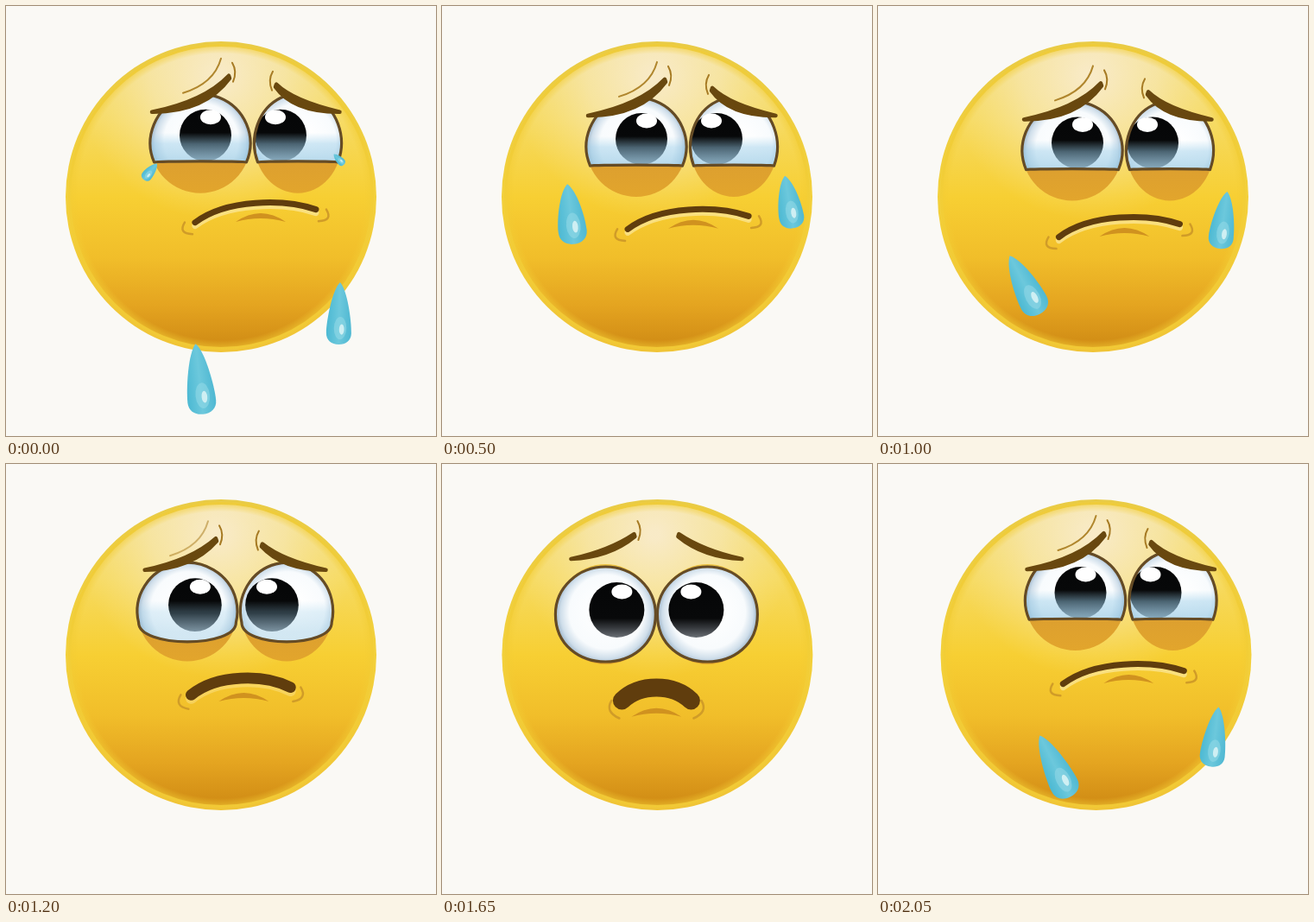
An HTML page with a canvas that plays this animation: 498x498 px, repeating every 2.1 s.

```html
<!DOCTYPE html>
<html lang="en">
<head>
<meta charset="utf-8">
<title>Crying face</title>
<style>
html, body { margin: 0; width: 100%; height: 100%; overflow: hidden; background: #faf9f5; }
canvas { display: block; width: 498px; height: 498px; }
</style>
</head>
<body>
<canvas id="stage" width="498" height="498"></canvas>
<script>
const ctx = document.getElementById('stage').getContext('2d');
const LOOP = 2100, STEP = 50;
const SOB = 375, FIRST_SOB = 1695, SOBS = 4;
const INK = '#69480f';

// lengths are in pixels; brow heights are measured from the eye centre
const sad = {
  x: 284, y: 164, turn: 1, wet: 1, look: -9,
  up: 57, corner: .4, low: -1,
  browIn: -77, browOut: -36, browReach: 58,
  mouthY: 256, mouthReach: 70, lips: 7
};
const wide = {
  x: 248, y: 174, turn: 0, wet: 0, look: -5,
  up: 55, corner: 0, low: 55,
  browIn: -92, browOut: -64, browReach: 42,
  mouthY: 274, mouthReach: 40, lips: 21
};
const tired = {
  x: 261, y: 191, turn: .3, wet: 1, look: -3,
  up: 19, corner: 0, low: 18,
  browIn: -88, browOut: -55, browReach: 49,
  mouthY: 282, mouthReach: 39, lips: 21
};
const poses = [[0, sad], [1120, sad], [1300, wide], [1650, wide], [1850, tired], [2000, sad], [LOOP, sad]];

// key points of a falling tear and the ages at which it meets them
const tearAges = [0, 80, 155, 280, 355, 405, 455];
const tearPaths = [
  { side: -1, width: 33, swell: 80, follow: 1.1,
    points: [[172, 186], [157, 207], [149, 241], [170, 323], [205, 350], [224, 432], [226, 545]] },
  { side: 1, width: 29, swell: 100, follow: .3,
    points: [[384, 176], [390, 186], [402, 227], [400, 248], [390, 316], [386, 356], [384, 545]] }
];

const clamp = k => Math.min(1, Math.max(0, k));
const smooth = k => k * k * (3 - 2 * k);
const mix = (a, b, k) => a + (b - a) * k;
const wave = (t, period, peak) => Math.cos((t - peak) / period * 2 * Math.PI);

function poseAt(t) {
  const i = poses.findLastIndex(([start]) => start <= t);
  const [t0, a] = poses[i], [t1, b] = poses[i + 1];
  const k = smooth((t - t0) / (t1 - t0));
  return Object.fromEntries(Object.keys(a).map(key => [key, mix(a[key], b[key], k)]));
}

function gradient(g, ...stops) {
  stops.forEach(([p, c]) => g.addColorStop(p, c));
  return g;
}

function oval(x, y, rx, ry, fill) {
  ctx.beginPath();
  ctx.ellipse(x, y, rx, ry, 0, 0, Math.PI * 2);
  ctx.fillStyle = fill;
  ctx.fill();
}

function curve(x, y, [cx, cy, ex, ey], color, width) {
  ctx.beginPath();
  ctx.moveTo(x, y);
  ctx.quadraticCurveTo(x + cx, y + cy, x + ex, y + ey);
  ctx.strokeStyle = color;
  ctx.lineWidth = width;
  ctx.stroke();
}

function head() {
  oval(249, 221, 180, 180, gradient(ctx.createLinearGradient(0, 41, 0, 401),
    [0, '#e9cb45'], [.5, '#f3d03a'], [1, '#f0c436']));
  oval(249, 221, 174, 174, gradient(ctx.createLinearGradient(0, 46, 0, 396),
    [0, '#f2dc80'], [.25, '#f6da60'], [.5, '#f7cf33'], [.7, '#f1be2a'], [.86, '#e4a420'], [1, '#cf8a14']));
  oval(249, 221, 174, 174, gradient(ctx.createRadialGradient(246, 82, 5, 246, 82, 165),
    [0, 'rgba(249,236,208,.9)'], [.45, 'rgba(248,234,190,.62)'], [1, 'rgba(249,230,150,0)']));
  oval(249, 221, 177, 177, gradient(ctx.createRadialGradient(249, 221, 166, 249, 221, 177),
    [0, 'rgba(242,204,52,0)'], [1, 'rgba(242,204,52,.7)']));
}

// the outline runs over the top, then back along the lower lid
function eyeShape(p, cx, cy, rx) {
  const dx = rx * Math.cos(p.corner), y = cy + p.up * Math.sin(p.corner), low = y + p.low * 4 / 3;
  ctx.beginPath();
  ctx.ellipse(cx, cy, rx, p.up, 0, Math.PI - p.corner, p.corner);
  ctx.bezierCurveTo(cx + dx, low, cx - dx, low, cx - dx, y);
  ctx.closePath();
}

function eyeball(p, side, cx, cy, rx) {
  oval(cx, cy, 62, 62, gradient(ctx.createRadialGradient(cx + 3, cy - 8, 10, cx, cy, 60),
    [0, '#ffffff'], [.66, '#f8fbfd'], [.85, '#cfdeea'], [1, '#8ea9c1']));
  const px = cx - side * 13 - p.turn * 7, py = cy + p.look, r = 32 - p.turn * 2;
  oval(px, py, r, r, gradient(ctx.createLinearGradient(0, py - r, 0, py + r),
    [0, '#050607'], [.65, '#08090a'], [.82, '#35383c'], [1, '#6a6f75']));
  ctx.globalAlpha = p.wet;
  ctx.fillStyle = gradient(ctx.createLinearGradient(0, cy - 12, 0, cy + 24),
    [0, 'rgba(160,210,235,0)'], [.35, 'rgba(150,203,232,.45)'], [1, 'rgba(150,200,226,.68)']);
  ctx.fillRect(cx - rx, cy - 12, rx * 2, 80);
  ctx.globalAlpha = 1;
  oval(px - side * 6, Math.max(py - 21, cy - p.up + 7), 12, 8.5, '#ffffff');
}

function eye(p, side) {
  const far = side > 0 ? p.turn : 0, squeeze = 1 - .13 * far;
  const cx = p.x + side * 59 - 5 * far, cy = p.y, rx = 58 * squeeze;
  const inX = cx - side * 33 * squeeze ** 2, inY = cy + p.browIn * squeeze;
  const outX = cx + side * p.browReach * squeeze, outY = cy + p.browOut;
  const bendX = cx - side * 5, bendY = outY - 6;

  // the brow hides whatever part of the eye lies above it
  ctx.save();
  ctx.beginPath();
  ctx.moveTo(outX + side * 40, outY);
  ctx.lineTo(outX, outY);
  ctx.quadraticCurveTo(bendX, bendY, inX, inY);
  ctx.lineTo(inX - side * 60, inY - 20);
  ctx.lineTo(inX - side * 60, 400);
  ctx.lineTo(outX + side * 40, 400);
  ctx.clip();
  oval(cx, cy, rx, 58, gradient(ctx.createLinearGradient(0, cy - 58, 0, cy + 58),
    [0, '#ecc242'], [.35, '#e8b536'], [.7, '#dda02f'], [1, '#e2a52c']));
  ctx.save();
  eyeShape(p, cx, cy, rx);
  ctx.clip();
  eyeball(p, side, cx, cy, rx);
  ctx.restore();
  eyeShape(p, cx, cy, rx);
  ctx.strokeStyle = '#654b25';
  ctx.lineWidth = 3.2;
  ctx.stroke();
  ctx.restore();

  const thick = 4 + 2.5 * p.turn;
  ctx.beginPath();
  ctx.moveTo(outX - side * 2, outY);
  ctx.quadraticCurveTo(bendX, bendY - thick, inX, inY - 1);
  ctx.lineTo(inX - side, inY + 2);
  ctx.quadraticCurveTo(bendX, bendY + thick, outX - side * 2, outY);
  ctx.fillStyle = ctx.strokeStyle = INK;
  ctx.lineWidth = 4.5;
  ctx.fill();
  ctx.stroke();

  const hook = side < 0 ? 1 : Math.min(1, p.turn * 3);
  curve(inX - side * 4, inY - 16, [-side * 6, 10, -side, 22], `rgba(166,122,35,${hook})`, 2);
  if (side < 0) curve(inX - 9, inY - 21, [-8, 29, -44, 40], `rgba(176,134,45,${p.turn})`, 2);
}

function mouth(p, x, y) {
  const r = p.mouthReach, tilt = 7.5 * p.turn, bend = r * .48;
  const line = (dy, color, width) => {
    ctx.beginPath();
    ctx.moveTo(x - r, y + tilt + dy);
    ctx.bezierCurveTo(x - bend, y - 20 + dy, x + bend, y - 20 + dy, x + r, y - tilt + dy);
    ctx.strokeStyle = color;
    ctx.lineWidth = width;
    ctx.stroke();
  };
  for (const side of [-1, 1]) {
    curve(x + side * (r + 12), y - side * tilt, [side * 8, 13, -side * 9, 10 + p.lips * .5], '#d09c28', 2.5);
  }
  const chinX = x + 6 * p.turn, chinY = y + 1 + p.lips * .85;
  ctx.beginPath();
  ctx.moveTo(chinX - 29, chinY);
  ctx.quadraticCurveTo(chinX, chinY - 20, chinX + 29, chinY);
  ctx.quadraticCurveTo(chinX, chinY - 8, chinX - 29, chinY);
  ctx.fillStyle = '#d0921f';
  ctx.fill();
  line(4, `rgba(252,234,160,${.7 * p.turn})`, p.lips);
  line(0, '#603d0d', p.lips);
}

// a smooth curve through the key points; returns place and velocity
function follow(points, age) {
  const i = tearAges.findLastIndex(a => a <= age);
  const k = (age - tearAges[i]) / (tearAges[i + 1] - tearAges[i]);
  const knot = n => points[Math.min(points.length - 1, Math.max(0, n))];
  return [0, 1].map(axis => {
    const [a, b, c, d] = [-1, 0, 1, 2].map(n => knot(i + n)[axis]);
    const q1 = c - a, q2 = 2 * a - 5 * b + 4 * c - d, q3 = 3 * b - a - 3 * c + d;
    return { place: b + k * (q1 + k * (q2 + k * q3)) / 2, speed: (q1 + k * (2 * q2 + 3 * k * q3)) / 2 };
  });
}

function tear(x, y, w, h, turn) {
  const r = w / 2, top = -h / 2, bottom = h / 2;
  ctx.save();
  ctx.translate(x, y);
  ctx.rotate(turn);
  ctx.beginPath();
  ctx.moveTo(0, top);
  for (const s of [1, -1]) {
    const ends = [[s * r * .6, top + h * .12], [s * r, bottom - r * 1.9], [s * r, bottom - r * .9]];
    const base = [[s * r, bottom - r * .3], [s * r * .55, bottom], [0, bottom]];
    if (s > 0) {
      ctx.bezierCurveTo(...ends.flat());
      ctx.bezierCurveTo(...base.flat());
    } else {
      ctx.bezierCurveTo(...base[1], ...base[0], ...ends[2]);
      ctx.bezierCurveTo(...ends[1], ...ends[0], 0, top);
    }
  }
  ctx.fillStyle = gradient(ctx.createLinearGradient(-r, 0, r, 0),
    [0, '#4cb9d3'], [.5, '#6cc8dc'], [1, '#4fb8d2']);
  ctx.fill();
  oval(r * .1, bottom - r * 1.3, r * .5, r * .9, 'rgba(145,216,230,.6)');
  oval(r * .22, bottom - r * 1.2, r * .2, r * .42, 'rgba(226,246,248,.8)');
  ctx.restore();
}

function tears(t, p) {
  for (let n = 0; n < SOBS; n++) {
    const age = (t - FIRST_SOB - n * SOB + 2 * LOOP) % LOOP;
    if (age >= tearAges.at(-1)) continue;
    // on the cheek a tear moves along with the face
    const cling = clamp((300 - age) / 150);
    for (const path of tearPaths) {
      const [x, y] = follow(path.points, age);
      const w = path.width * clamp(age / path.swell);
      const h = w * (1.9 + age / 700);
      tear(x.place + (p.x - sad.x) * path.follow * cling, y.place + (p.y - sad.y) * .55 * cling,
        w, h, Math.atan2(-x.speed, Math.abs(y.speed)));
    }
  }
}

function draw(t) {
  const p = poseAt(t);
  const phase = t - FIRST_SOB;
  const bob = p.turn * (5 * wave(phase, SOB / 2, 70) - 1);
  const sway = p.turn * 5.5 * (1 - wave(phase, SOB, 30));
  const drift = Math.max(0, t - 1600) / 450 * 3.5;

  ctx.fillStyle = '#faf9f5';
  ctx.fillRect(0, 0, 498, 498);
  ctx.lineCap = ctx.lineJoin = 'round';
  ctx.save();
  ctx.translate(drift, 0);
  head();
  const mouthX = p.x - 5 * p.turn + sway;
  const mouthY = p.mouthY + 1.3 * bob - .6 * sway;
  p.y += bob;
  eye(p, -1);
  eye(p, 1);
  mouth(p, mouthX, mouthY);
  ctx.restore();
  p.y -= bob;
  tears(t, p);
}

const begin = performance.now();
function tick() {
  const t = (performance.now() - begin) % LOOP;
  draw(Math.floor(t / STEP) * STEP);
  requestAnimationFrame(tick);
}
tick();
</script>
</body>
</html>
```
